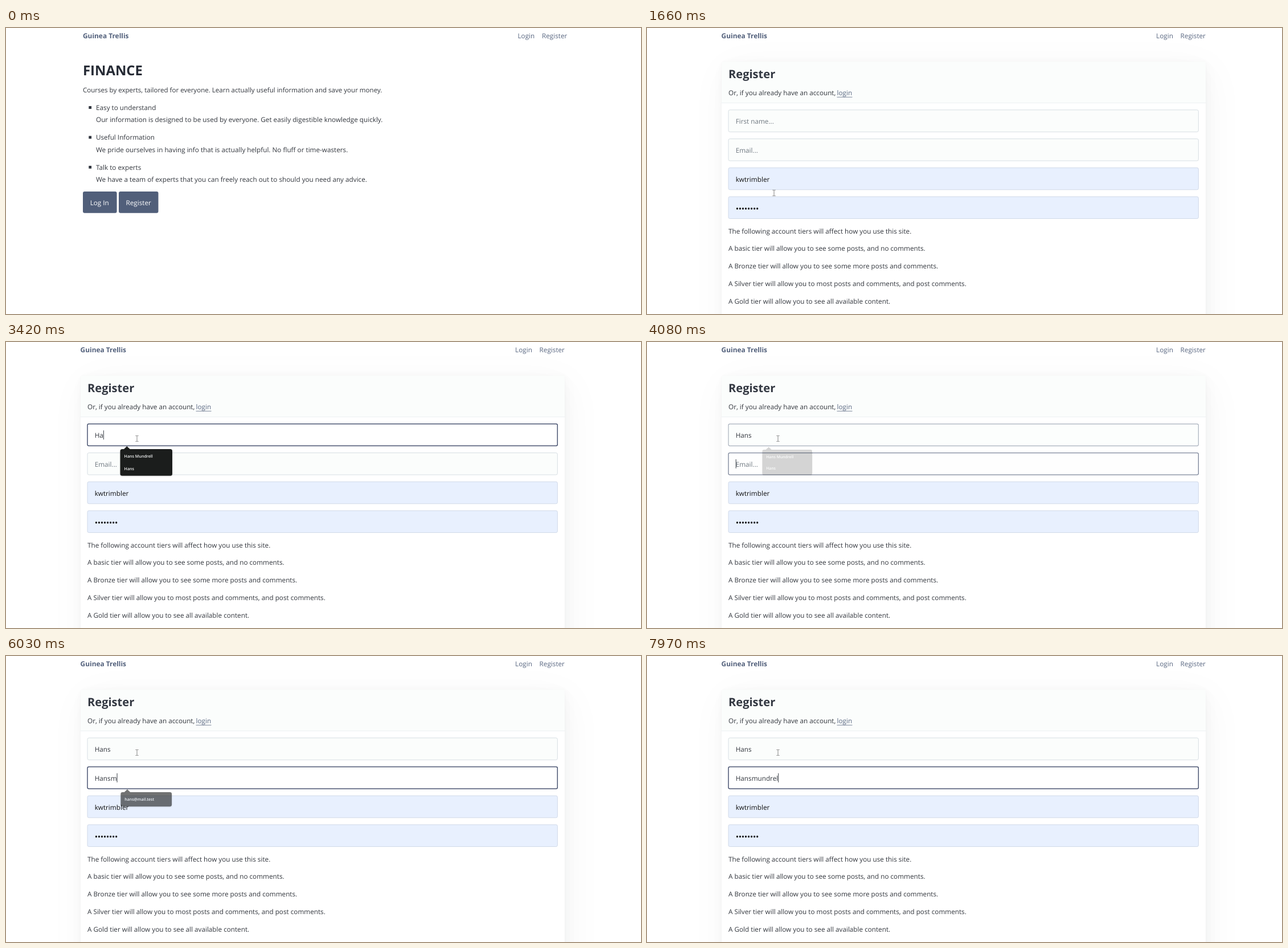
These frames come from a looping animation (1115x502 px, 8 s). An HTML page:

```html
<!DOCTYPE html>
<html lang="en">
<head>
<meta charset="utf-8">
<title>Register</title>
<style>
  html, body { margin: 0; width: 100%; height: 100%; overflow: hidden; background: #fff; }
  #stage { position: relative; width: 1115px; height: 502px; overflow: hidden; font-size: 12.3px; }
  #card {
    position: absolute; left: 130.7px; top: 58.5px; width: 850px; height: 800px;
    border-radius: 3px; background: #fff;
    box-shadow: .0335em .067em .402em rgba(27,40,50,.012), .1125em .225em 1.35em rgba(27,40,50,.018),
      .2085em .417em 2.502em rgba(27,40,50,.022), .5em 1em 6em rgba(27,40,50,.04),
      0 0 0 .0625em rgba(27,40,50,.012);
  }
  #card::before {
    content: ""; display: block; height: 72px; background: #fbfdfc;
    border-bottom: 1px solid #edf0f3; border-radius: 3px 3px 0 0;
  }
  svg { position: absolute; left: 0; top: 0; }
  text {
    font: 11.73px "Open Sans", "Noto Sans", sans-serif;
    text-rendering: geometricPrecision; fill: #33373e;
  }
  .title { font-weight: 700; font-size: 23.9px; fill: #262b35; }
  .heading { font-weight: 700; font-size: 20.1px; fill: #333842; }
  .brand { font-weight: 700; font-size: 11.9px; fill: #52607b; }
  .link { fill: #596781; }
  .intro { font-size: 11.56px; }
  .white { fill: #fff; }
  .hint { fill: #6f7880; }
  .filled { fill: #111; }
  .option { font-weight: 600; font-size: 7.1px; fill: #f4f5f5; }
  #menu { filter: drop-shadow(0 1px 1px rgba(0,0,0,.15)); }
</style>
</head>
<body>
<div id="stage">
  <div id="card"></div>
  <svg id="view" width="1115" height="502" viewBox="0 0 1115 502"></svg>
</div>
<script>
const LOOP = 8000, PAGE_SWITCH = 1540;
const $ = id => document.getElementById(id);
const text = (x, y, str, cls = '', id = '') => `<text x="${x}" y="${y}" class="${cls}" id="${id}">${str}</text>`;
const rect = (x, y, w, h, attrs) => `<rect x="${x}" y="${y}" width="${w}" height="${h}" ${attrs}/>`;
const show = (id, on) => { $(id).style.display = on ? '' : 'none'; };
const ramp = (t, a, b) => Math.min(1, Math.max(0, (t - a) / (b - a)));
const mix = (a, b, k) => `rgb(${a.map((v, i) => v + (b[i] - v) * k)})`;

const nav = shift =>
  text(135 - shift, 17.5, 'Guinea Trellis', 'brand') +
  text(898.5 - shift, 17.5, 'Login', 'link') +
  text(941 - shift, 17.5, 'Register', 'link');

const features = [
  ['Easy to understand', 'Our information is designed to be used by everyone. Get easily digestible knowledge quickly.'],
  ['Useful Information', 'We pride ourselves in having info that is actually helpful. No fluff or time-wasters.'],
  ['Talk to experts', 'We have a team of experts that you can freely reach out to should you need any advice.']
];
const tiers = [
  'The following account tiers will affect how you use this site.',
  'A basic tier will allow you to see some posts, and no comments.',
  'A Bronze tier will allow you to see some more posts and comments.',
  'A Silver tier will allow you to most posts and comments, and post comments.',
  'A Gold tier will allow you to see all available content.'
];

const fieldY = i => 143.8 + i * 50.75;
const field = i => rect(143, fieldY(i), 825.3, 38.5, `rx="2.5" id="field${i}" fill="#e8f0fe" stroke="#d0d9e8"`);

const homePage = nav(0) +
  text(135, 82.5, 'FINANCE', 'title') +
  text(135, 113.3, 'Courses by experts, tailored for everyone. Learn actually useful information and save your money.', 'intro') +
  features.map(([name, detail], i) => {
    const y = 144 + i * 52.4;
    return rect(145.3, y - 6.9, 4.8, 4.8, 'fill="#30353e"') + text(158, y, name) + text(158, y + 21.4, detail);
  }).join('') +
  rect(135, 287, 59.6, 37.7, 'rx="3" fill="#515f7a"') +
  rect(197.5, 286.3, 70.6, 39.1, 'rx="3.5" fill="none" stroke="#bcc3da" stroke-width="1.8" id="ring"') +
  rect(198, 287, 69.5, 37.7, 'rx="3" id="button"') +
  text(147.7, 311, 'Log In', 'white') +
  '<circle id="press" cx="222" cy="307.5" r="6.5" fill="#fbf24f"/>' +
  text(210.5, 311, 'Register', 'white');

const registerPage = nav(4.4) +
  text(143, 87.6, 'Register', 'heading') +
  text(143, 118.4, 'Or, if you already have an account,') +
  text(333.5, 118.4, 'login', 'link') + rect(333.5, 120.8, 27, 1, 'fill="#7c879b"') +
  [0, 1, 2, 3].map(field).join('') +
  text(155.7, 168.1, '', '', 'value0') + text(155.7, 218.8, '', '', 'value1') +
  text(155.7, 269.6, 'kwtrimbler', 'filled') +
  Array.from({ length: 8 }, (_, i) => `<circle cx="${158.4 + i * 5.04}" cy="317" r="1.65" fill="#111"/>`).join('') +
  tiers.map((line, i) => text(143, 360.6 + i * 30.8, line)).join('') +
  rect(0, 0, 1, 16, 'id="caret" fill="#3b4048"') +
  '<g id="menu"></g>' +
  '<circle id="click" cx="229.5" cy="169.5" r="6.5" fill="#fbf24f"/>';

$('view').innerHTML =
  `<g id="home">${homePage}</g><g id="register">${registerPage}</g>
  <g id="pointer">
    <path id="arrow" d="M0 0V12L2.8 9.4 4.7 13.6 6.5 12.8 4.6 8.8H8.5Z" fill="#fff" stroke="#222" stroke-width=".8"/>
    <path id="beam" d="M-2.5 -5H-.6L0 -4.4 .6 -5H2.5M0 -4.4V4.4M-2.5 5H-.6L0 4.4 .6 5H2.5" fill="none" stroke-width=".9"/>
  </g>`;

// Each entry: text, placeholder, and the time of every key press.
const inputs = [
  ['Hans', 'First name...', [3210, 3420, 3610, 3680]],
  ['Hansmundrel', 'Email...', [4690, 4890, 5030, 5290, 5970, 6300, 7290, 7430, 7630, 7750, 7970]]
];
const caretOff = [[2740, 3210], [4490, 4690], [5760, 5970], [6830, 7290]];

// Suggestion lists: start, end, fade duration, field, width, rows.
const menus = [
  [2200, 3210, 0, 0, 91.5, ['percy', 'tasks', 'users', 'things', 'things-owners', 'players']],
  [3210, 3420, 0, 0, 91.5, ['Hans Mundrell', 'Hans', 'hidden', 'helpers']],
  [3420, 3950, 160, 0, 91.5, ['Hans Mundrell', 'Hans']],
  [4690, 4960, 0, 1, 114.3, ['h.mundrell@mail.test', 'hollow@x.test', 'hans@mail.test']],
  [4960, 5970, 160, 1, 91.5, ['hans@mail.test']]
];

// Pointer stops: time, x, y.
const path = [[190, 720, 460], [560, 510, 420], [990, 222, 307.5], [1600, 222, 307.5], [2070, 230, 169.5]];

function drawInput([value, placeholder, keys], i, t, focus) {
  const count = keys.filter(k => t >= k).length;
  const label = $('value' + i), box = $('field' + i);
  label.textContent = count ? value.slice(0, count) : placeholder;
  label.setAttribute('class', count ? '' : 'hint');
  box.setAttribute('fill', mix([251, 253, 252], [255, 255, 255], focus));
  box.setAttribute('stroke', mix([215, 222, 227], [76, 86, 115], focus));
  box.setAttribute('stroke-width', 1 + .5 * focus);
  return count ? label.getComputedTextLength() : 0;
}

function drawMenu(t) {
  const entry = menus.find(([start, end, fade]) => t >= start && t < end + fade);
  show('menu', entry);
  if (!entry) return;
  const [, end, fade, index, width, rows] = entry;
  const opacity = fade ? 1 - ramp(t, end, end + fade) : 1;
  const top = fieldY(index) + 44.2, height = rows.length * 21.15 + 4.5;
  const scale = .95 + .05 * opacity, cx = 200.5 + width / 2, cy = top + height / 2;
  $('menu').setAttribute('opacity', opacity);
  $('menu').setAttribute('transform', `translate(${cx} ${cy}) scale(${scale}) translate(${-cx} ${-cy})`);
  $('menu').innerHTML =
    `<path d="M206 ${top + 1}L212.3 ${top - 5} 218.6 ${top + 1}Z" fill="#1b1d1c"/>` +
    rect(200.5, top, width, height, 'rx="3.5" fill="#1b1d1c"') +
    rows.map((row, i) => text(207.6, top + 15.4 + i * 21.15, row, 'option')).join('');
}

function drawPointer(t, home) {
  show('pointer', t >= path[0][0]);
  const next = path.findIndex(p => p[0] > t);
  const b = path[next < 0 ? path.length - 1 : next];
  const a = next > 0 ? path[next - 1] : b;
  const k = a === b ? 1 : ramp(t, a[0], b[0]);
  const x = a[1] + (b[1] - a[1]) * k, y = a[2] + (b[2] - a[2]) * k;
  const arrow = home && t < 930;
  $('pointer').setAttribute('transform', `translate(${x} ${y})`);
  show('arrow', arrow);
  show('beam', !arrow);
  $('beam').setAttribute('stroke', home ? '#8f97aa' : '#777');
}

function draw(t) {
  const home = t < PAGE_SWITCH;
  show('home', home);
  show('register', !home);
  show('card', !home);
  drawPointer(t, home);
  if (home) {
    $('button').setAttribute('fill', mix([81, 95, 122], [71, 80, 105], ramp(t, 860, 990)));
    $('ring').setAttribute('opacity', ramp(t, 1060, 1260));
    show('press', t >= 1060 && t < 1200);
    return;
  }
  const handover = ramp(t, 3950, 4150);
  const widths = [
    drawInput(inputs[0], 0, t, ramp(t, 2210, 2410) * (1 - handover)),
    drawInput(inputs[1], 1, t, handover)
  ];
  const active = t < 3950 ? 0 : 1;
  $('caret').setAttribute('x', 155.7 + widths[active]);
  $('caret').setAttribute('y', active ? 205.8 : 155.2);
  show('caret', t >= 2200 && !caretOff.some(([a, b]) => t >= a && t < b));
  show('click', t >= 2140 && t < 2340);
  drawMenu(t);
}

function frame() {
  draw(performance.now() % LOOP);
  requestAnimationFrame(frame);
}
frame();
</script>
</body>
</html>
```
